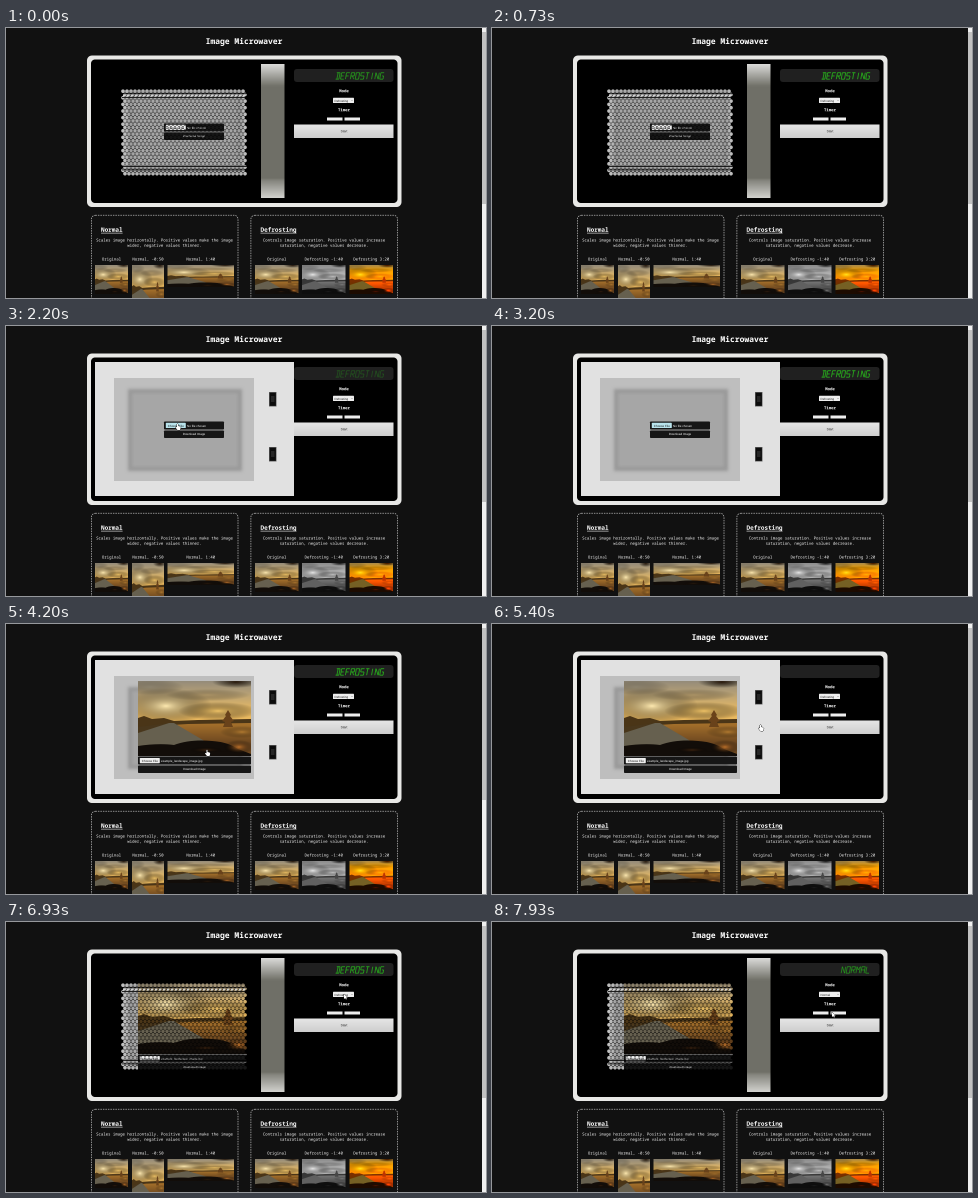
An HTML page with a canvas that plays this animation: 480 px wide and 270 px high, repeating every 8000 ms.

```html
<!DOCTYPE html>
<html lang="en">
<head>
<meta charset="utf-8">
<title>Image Microwaver</title>
<style>
html, body { margin: 0; width: 100%; height: 100%; overflow: hidden; background: #111; }
canvas { display: block; width: 480px; height: 270px; }
</style>
</head>
<body>
<canvas id="stage" width="480" height="270"></canvas>
<script>
const LOOP = 8000;
const MONO = '"Noto Sans Mono", "DejaVu Sans Mono", monospace';
const SANS = '"Liberation Sans", Arial, sans-serif';
const ctx = document.getElementById('stage').getContext('2d');
ctx.imageSmoothingQuality = 'high';

// Still parts are painted enlarged so that tiny text and edges scale down smoothly
const DETAIL = 4;
function layer(w, h, paint) {
  const canvas = document.createElement('canvas');
  canvas.width = w * DETAIL;
  canvas.height = h * DETAIL;
  const g = canvas.getContext('2d');
  g.imageSmoothingQuality = 'high';
  g.scale(DETAIL, DETAIL);
  paint(g);
  return canvas;
}

function box(g, x, y, w, h, fill, radius = 0) {
  g.fillStyle = fill;
  g.beginPath();
  g.roundRect(x, y, w, h, radius);
  g.fill();
}

function text(g, str, x, y, font, color = '#fff', align = 'center') {
  g.font = font;
  g.textRendering = 'geometricPrecision';
  g.fillStyle = color;
  g.textAlign = align;
  g.fillText(str, x, y);
}

function gradient(g, x0, y0, x1, y1, ...stops) {
  const fill = g.createLinearGradient(x0, y0, x1, y1);
  stops.forEach(([at, color]) => fill.addColorStop(at, color));
  return fill;
}

function glow(g, x, y, rx, ry, color) {
  g.save();
  g.translate(x, y);
  g.scale(rx, ry);
  const fill = g.createRadialGradient(0, 0, 0, 0, 0, 1);
  fill.addColorStop(0, color);
  fill.addColorStop(1, 'transparent');
  g.fillStyle = fill;
  g.fillRect(-1, -1, 2, 2);
  g.restore();
}

function shape(g, path, fill) {
  g.fillStyle = fill;
  g.fill(new Path2D(path));
}

// Sunset road seen over a dashboard
const photo = layer(113, 75, g => {
  box(g, 0, 0, 113, 75, gradient(g, 0, 0, 0, 42,
    [0, '#958c7a'], [.3, '#b7a176'], [.65, '#e2b766'], [1, '#ecb95c']));
  glow(g, 28, 25, 46, 18, '#ffeab0');
  glow(g, 80, 30, 40, 9, '#efc266');
  glow(g, 12, 6, 34, 8, '#77736780');
  glow(g, 70, 14, 42, 6, '#a0875a90');
  glow(g, 98, 1, 24, 6, '#2a1a0c');
  box(g, 0, 41, 113, 34, gradient(g, 0, 41, 0, 62, [0, '#aa742c'], [1, '#6c4720']));
  shape(g, 'M0 37 L6 35 L14 38 L26 37 L36 40 L60 39 L113 38 V42 L50 43 L0 46Z', '#4a3517');
  shape(g, 'M0 51 L31 42 H36 L70 62 L60 75 H0Z', '#66604f');
  shape(g, 'M0 46 L31 42 L0 52Z', '#49371c');
  shape(g, 'M90 29 L93 34 L92 35 L96 40 L93 41 L95 46 H85 L87 41 L84 40 L88 35 L87 34Z', '#69421a');
  glow(g, 104, 51, 22, 6, '#c48735b0');
  shape(g, 'M0 65 Q20 62 36 64 Q52 58 74 60 Q90 61 100 68 L113 73 V75 H0Z', '#120d09');
  glow(g, 101, 66, 15, 7, '#bb702a');
  glow(g, 68, 69, 16, 3, '#5a321590');
  shape(g, 'M50 75 L64 71 Q88 68 113 74 V75Z', '#120d09');
});

const MESH = { left: 29, top: 28.2, pitch: 4, rowStep: 3.3, rows: 26, cols: 31 };

function dot(g, x, y, radius) {
  g.beginPath();
  g.arc(x, y, radius, 0, 7);
  g.fill();
}

const door = layer(200, 136, g => {
  const { left, top, pitch, rowStep, rows, cols } = MESH;
  box(g, 0, 0, 200, 136, '#000');
  g.globalCompositeOperation = 'destination-out';
  for (let row = 0; row < rows; row++) {
    for (let col = 0; col < cols; col++) {
      dot(g, left + (col + row % 2 / 2) * pitch, top + row * rowStep, 1.85);
    }
  }
  g.globalCompositeOperation = 'source-over';
  [30.3, 34, 103, 106.5].forEach(y => box(g, 28, y, 125, .8, '#000'));
  g.fillStyle = '#d4d4d4';
  for (let col = 0; col < cols; col++) dot(g, left + col * pitch + 1, 32.6, 1.1);
  box(g, 167, 1, 23.5, 134, gradient(g, 0, 1, 0, 135,
    [0, '#dcdcda'], [.16, '#74746c'], [.18, '#6f6f67'], [.85, '#6f6f67'], [.87, '#85857e'], [1, '#d2d2ce']));
});

function card(g, x, title, lines, thumbs) {
  g.strokeStyle = '#c4c4c4';
  g.lineWidth = .7;
  g.setLineDash([1.5, 1]);
  g.beginPath();
  g.roundRect(x + .4, 187.2, 146.6, 100, 4);
  g.stroke();
  g.setLineDash([]);
  text(g, title, x + 10, 203.8, `bold 6px ${MONO}`, '#fff', 'left');
  box(g, x + 10, 204.8, title.length * 3.6, .6, '#fff');
  lines.forEach((line, i) => text(g, line, x + 73.5, 213.4 + i * 5.4, `500 4px ${MONO}`));
  thumbs.forEach(([label, left, w, h, filter]) => {
    text(g, label, left + w / 2, 232.4, `500 4px ${MONO}`);
    g.filter = filter || 'none';
    g.drawImage(photo, left, 237, w, h);
    g.filter = 'none';
  });
}

const page = layer(480, 270, g => {
  box(g, 0, 0, 480, 270, '#111');
  text(g, 'Image Microwaver', 238, 16, `bold 8px ${MONO}`);
  box(g, 81, 27.5, 314.5, 151.5, '#e8e8e6', 5);
  box(g, 85, 31.5, 306.5, 143.5, '#000', 4);

  text(g, 'Mode', 338, 64.3, `bold 4px ${MONO}`);
  text(g, 'Timer', 338, 83.2, `bold 4px ${MONO}`);
  box(g, 321, 89.5, 15.5, 3, '#eee');
  box(g, 338.5, 89.5, 15.5, 3, '#eee');
  box(g, 288, 96.5, 99.5, 13.5, gradient(g, 0, 96.5, 0, 110, [0, '#e6e6e6'], [1, '#cecece']));
  text(g, 'Start', 338, 104.3, `3.2px ${SANS}`, '#222');

  card(g, 85, 'Normal',
    ['Scales image horizontally. Positive values make the image', 'wider, negative values thinner.'],
    [['Original', 89, 33, 29], ['Normal, -0:50', 126, 32, 43], ['Normal, 1:40', 161.5, 66.5, 22]]);
  card(g, 244.5, 'Defrosting',
    ['Controls image saturation. Positive values increase', 'saturation, negative values decrease.'],
    [['Original', 249, 43.5, 29], ['Defrosting -1:40', 296, 43.5, 29, 'saturate(0)'],
      ['Defrosting 3:20', 343.5, 43.5, 29, 'saturate(3.5)']]);

  box(g, 476, 0, 4, 270, '#efefef');
  box(g, 476, 4, 4, 172, '#c1c1c1');
});

const cavity = layer(199, 134, g => {
  box(g, 0, 0, 199, 134, '#e1e1e1');
  box(g, 19, 16, 140, 103, '#bebebe');
  g.filter = `blur(${1.5 * DETAIL}px)`;
  box(g, 33, 27, 114, 82, '#9a9a9a');
  box(g, 37, 31, 106, 74, '#a6a6a6');
  g.filter = 'none';
  [30, 85].forEach(y => {
    box(g, 174, y, 7.5, 14.5, '#666');
    box(g, 174.6, y + .6, 6.3, 13.3, '#0c0c0c');
    box(g, 176, y + 4, 3.5, 6, '#262626');
  });
});

// Piecewise eased track of [time, value] keys
function track(t, keys) {
  let i = 0;
  while (i < keys.length - 2 && t >= keys[i + 1][0]) i++;
  const [t0, a] = keys[i], [t1, b] = keys[i + 1];
  const p = Math.min(1, Math.max(0, (t - t0) / (t1 - t0)));
  return a + (b - a) * p * p * (3 - 2 * p);
}

const SEGMENTS = {
  D: 'M0 0H1V2H0M.4 0V2', E: 'M1 0H0V2H1M0 1H.8', F: 'M1 0H0V2M0 1H.8',
  R: 'M0 2V0H1V1H0M.5 1L1 2', O: 'M0 0H1V2H0Z', S: 'M1 0H0V1H1V2H0',
  T: 'M0 0H1M.5 0V2', I: 'M.5 0V2', N: 'M0 2V0L1 2V0', G: 'M1 0H0V2H1V1H.5',
  M: 'M0 2V0L.5 1L1 0V2', A: 'M0 2V0H1V2M0 1H1', L: 'M0 0V2H1'
};

function display(word, opacity) {
  box(ctx, 288, 41, 99.5, 13, '#202020', 3);
  ctx.save();
  ctx.globalAlpha = opacity;
  ctx.strokeStyle = '#28b81c';
  ctx.lineWidth = .24;
  [...word].forEach((letter, i) => {
    ctx.save();
    ctx.transform(3.3, 0, -.6, 3.25, 379 - (word.length - i) * 4.9 + .8, 44.7);
    ctx.stroke(new Path2D(SEGMENTS[letter]));
    ctx.restore();
  });
  ctx.restore();
}

function fileControls(x, y, w, name, hover) {
  const font = `3px ${SANS}`;
  box(ctx, x, y, w, 8, '#161616', .8);
  box(ctx, x, y + 9, w, 7.5, '#161616', .8);
  box(ctx, x + 1.8, y + 1.3, 20, 5.3, hover ? '#b9e3ec' : '#eee', .6);
  text(ctx, 'Choose File', x + 11.8, y + 5, font, '#111');
  text(ctx, name, x + 23, y + 5, font, '#fff', 'left');
  text(ctx, 'Download Image', x + w / 2, y + 13.8, font);
}

const HAND = 'M0 0Q1-.6 1 .5V2L3 2.5Q4 3 3.5 4.5L3 6H.5L-1.5 3.5Q-1.5 2.5 0 3.2Z';
const ARROW = 'M0 0V5L1.2 4L2 5.5L2.8 5.1L2 3.6H3.6Z';

function cursor(x, y, path) {
  ctx.save();
  ctx.translate(x, y);
  ctx.strokeStyle = '#111';
  ctx.lineWidth = .8;
  ctx.stroke(new Path2D(path));
  shape(ctx, path, '#fff');
  ctx.restore();
}

const OPACITY = [[0, .82], [900, 1], [1530, 1], [2450, .15], [3270, 1], [4130, 1], [5000, 0],
  [5400, 0], [6150, 1], [6800, 1], [7500, .25], [8000, .75]];
const DOOR = [[930, 1], [1360, 0], [5420, 0], [5830, 1]];
const POINTER_X = [[1330, 268], [1530, 268], [2050, 171], [2400, 171], [4130, 200.5], [4230, 200.5],
  [5000, 268], [5450, 268], [5860, 323], [6100, 323], [6500, 338], [7100, 338], [7700, 340]];
const POINTER_Y = [[1330, 102], [1530, 102], [2050, 98], [2400, 98], [4130, 126], [4230, 126],
  [5000, 101], [5450, 101], [5860, 90], [6100, 90], [6500, 72], [7100, 72], [7700, 90]];

function draw(t) {
  const mode = t < 6950 ? 'Defrosting' : 'Normal';
  const closed = track(t, DOOR);
  const hasPhoto = t >= 4130;

  ctx.drawImage(page, 0, 0, 480, 270);
  display(mode.toUpperCase(), track(t, OPACITY));
  box(ctx, 327, 69.8, 21, 5.2, '#eee', .5);
  text(ctx, mode, 328.5, 73.5, `3px ${SANS}`, '#222', 'left');
  text(ctx, '⌄', 346, 73, `3px ${SANS}`, '#222');

  ctx.drawImage(cavity, 89, 36, 199, 134);
  if (hasPhoto) {
    ctx.drawImage(photo, 132, 57, 113, 75);
    fileControls(132, 132.6, 113, 'example_landscape_image.jpg', false);
  } else {
    fileControls(158, 95.5, 60, 'No file chosen', t >= 2000);
  }
  if (closed > .01) ctx.drawImage(door, 88, 35, 200 * closed, 136);

  if (t >= 930 && t < 2400 || hasPhoto) {
    cursor(track(t, POINTER_X), track(t, POINTER_Y), t < 5600 ? HAND : ARROW);
  }
}

function frame() {
  draw(performance.now() % LOOP);
  requestAnimationFrame(frame);
}
frame();
</script>
</body>
</html>
```
